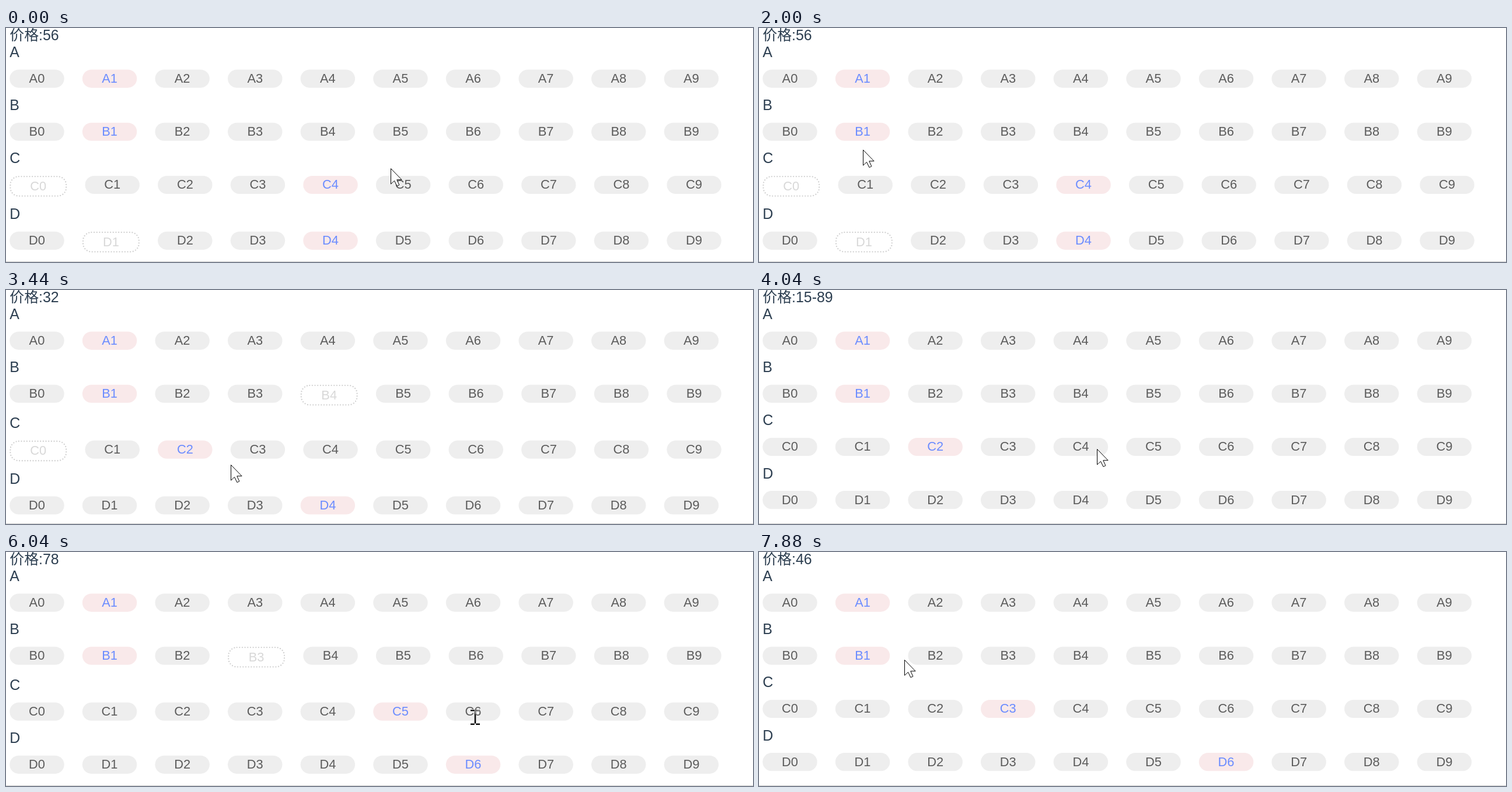
Recreate the animation shown at these times as an HTML page with a canvas. Size 1280 by 402 pixels, loop 8 s.

```html
<!DOCTYPE html>
<html lang="zh">
<head>
<meta charset="utf-8">
<style>
  html, body { margin: 0; width: 100%; height: 100%; overflow: hidden; background: #fff; }
  canvas { display: block; }
</style>
</head>
<body>
<canvas id="stage" width="1280" height="402"></canvas>
<script>
const ctx = document.getElementById('stage').getContext('2d');
const LOOP = 8000, LAST = 39;
const S = 1.5575;                       // page zoom
const LEFT = 4 * S, PITCH = 80 * S, W = 60 * S, H = 20 * S, R = 10 * S;
const BORDER = 1.5 * S, GROW = 2 * BORDER, TOP = 71.5, ROW = 91.2;
const FONT = 'Arial, "Liberation Sans", "Noto Sans CJK SC", "Noto Sans CJK", sans-serif';

// Prices by selection, and the combinations that are out of stock
const prices = {
  A1B1C4D4: '56', A1C4D4: '6-92', A1B1C1D4: '97', A1B1C2D4: '32', A1B1C2: '15-89',
  A1B1C5: '21-78', A1B1C5D6: '78', A1B1C3D6: '46'
};
const missing = ['A1B1C0D4', 'A1B1C4D1', 'A4B1C1D4', 'A1B4C2D4', 'A1B3C5D6'];

// Pointer stops by step: a chip name is a click, a pair is a place passed
const stops = [
  [0, [659, 241]], [4, 'B1'], [6, [193, 89]], [9, 'B1'], [12, 'C1'], [14, [292, 271]],
  [16, 'C2'], [19, 'D4'], [20, [579, 273]], [23, 'C5'], [27, 'D6'], [30, [804, 284]],
  [34, [554, 265]], [36, 'C3'], [38, [340, 163]], [39, [249, 185]]
];

const startOf = i => 40 * Math.floor(i * 5.06);

function stepAt(t) {
  let i = LAST;
  while (startOf(i) > t) i--;
  return i;
}

function place(stop) {
  if (Array.isArray(stop)) return stop;
  const row = 'ABCD'.indexOf(stop[0]);
  return [LEFT + stop[1] * PITCH + W / 2, TOP + row * ROW + H / 2];
}

const keyOf = picks => Object.values(picks).join('');

function picksAt(step) {
  const picks = { A: 'A1', B: 'B1', C: 'C4', D: 'D4' };
  for (const [at, stop] of stops) {
    if (at > step || Array.isArray(stop)) continue;
    const row = stop[0];
    picks[row] = picks[row] === stop ? '' : stop;
  }
  return picks;
}

function isSoldOut(name, picks) {
  return missing.includes(keyOf({ ...picks, [name[0]]: name }));
}

function text(str, x, y, size, color, align = 'left') {
  ctx.font = size + 'px ' + FONT;
  ctx.textAlign = align;
  ctx.fillStyle = color;
  ctx.fillText(str, x, y);
}

function pill(x, y, w, h, r) {
  ctx.beginPath();
  ctx.roundRect(x, y, w, h, r);
}

function chip(name, x, y, picked) {
  pill(x, y, W, H, R);
  ctx.fillStyle = picked ? '#f9e9ea' : '#eee';
  ctx.fill();
  text(name, x + W / 2, y + 22.5, 14 * S, picked ? '#6b8cff' : '#5c5c5c', 'center');
}

function soldOut(name, x, y) {
  const b = BORDER / 2;
  pill(x + b, y + b, W + BORDER, H + BORDER, R - b);
  ctx.strokeStyle = '#d3d3d3';
  ctx.lineWidth = BORDER;
  ctx.lineCap = 'round';
  ctx.setLineDash([0, 2 * BORDER]);
  ctx.stroke();
  ctx.setLineDash([]);
  text(name, x + (W + GROW) / 2, y + BORDER + 22.5, 14 * S, '#d8d8d8', 'center');
}

function drawRows(picks) {
  let top = TOP;
  for (const row of 'ABCD') {
    text(row, LEFT, top - 21.5, 16 * S, '#2c3e50');
    let x = LEFT, extra = 0;
    for (let n = 0; n < 10; n++, x += PITCH) {
      const name = row + n;
      if (isSoldOut(name, picks)) {
        soldOut(name, x, top);
        x += GROW;
        extra = GROW;
      } else {
        chip(name, x, top, picks[row] === name);
      }
    }
    top += ROW + extra;
  }
}

function drawArrow(x, y) {
  const pts = [[0, 0], [0, 26.5], [6, 20.9], [10.4, 30], [14.4, 28.2], [10.3, 19.2], [18.6, 19.2]];
  ctx.beginPath();
  pts.forEach(([dx, dy]) => ctx.lineTo(x + dx + 0.5, y + dy + 0.5));
  ctx.closePath();
  ctx.fillStyle = '#fff';
  ctx.fill();
  ctx.strokeStyle = '#000';
  ctx.lineWidth = 1;
  ctx.lineCap = 'butt';
  ctx.stroke();
}

function drawBeam(x, y) {
  ctx.globalCompositeOperation = 'difference';
  ctx.fillStyle = '#fff';
  for (const dy of [-13, 10.6]) {
    ctx.fillRect(x - 8, y + dy, 6.8, 2.4);
    ctx.fillRect(x + 1.2, y + dy, 6.8, 2.4);
  }
  ctx.fillRect(x - 1.3, y - 10.6, 2.6, 21.2);
  ctx.globalCompositeOperation = 'source-over';
}

// The pointer turns into a beam over a chip's label
function overLabel(x, y) {
  const dx = (x - LEFT) % PITCH - W / 2 - 1;
  const dy = (y - TOP) % ROW;
  return Math.abs(dx) < 15 && dy > 0 && dy < H + GROW;
}

function drawPointer(step) {
  const k = Math.max(1, stops.findIndex(s => s[0] >= step));
  const [[t0, from], [t1, to]] = [stops[k - 1], stops[k]];
  const a = place(from), b = place(to), f = (step - t0) / (t1 - t0);
  const [x, y] = a.map((v, i) => Math.round(v + (b[i] - v) * f));
  (overLabel(x, y) ? drawBeam : drawArrow)(x, y);
}

function draw(t) {
  const step = stepAt(t), picks = picksAt(step);
  ctx.fillStyle = '#fff';
  ctx.fillRect(0, 0, 1280, 402);
  text('价格:' + prices[keyOf(picks)], LEFT, 21, 16 * S, '#2c3e50');
  drawRows(picks);
  ctx.fillStyle = '#ccc';
  ctx.fillRect(0, 401, 1280, 1);
  drawPointer(step);
}

const begin = performance.now();
function tick() {
  draw((performance.now() - begin) % LOOP);
  requestAnimationFrame(tick);
}
tick();
</script>
</body>
</html>
```
